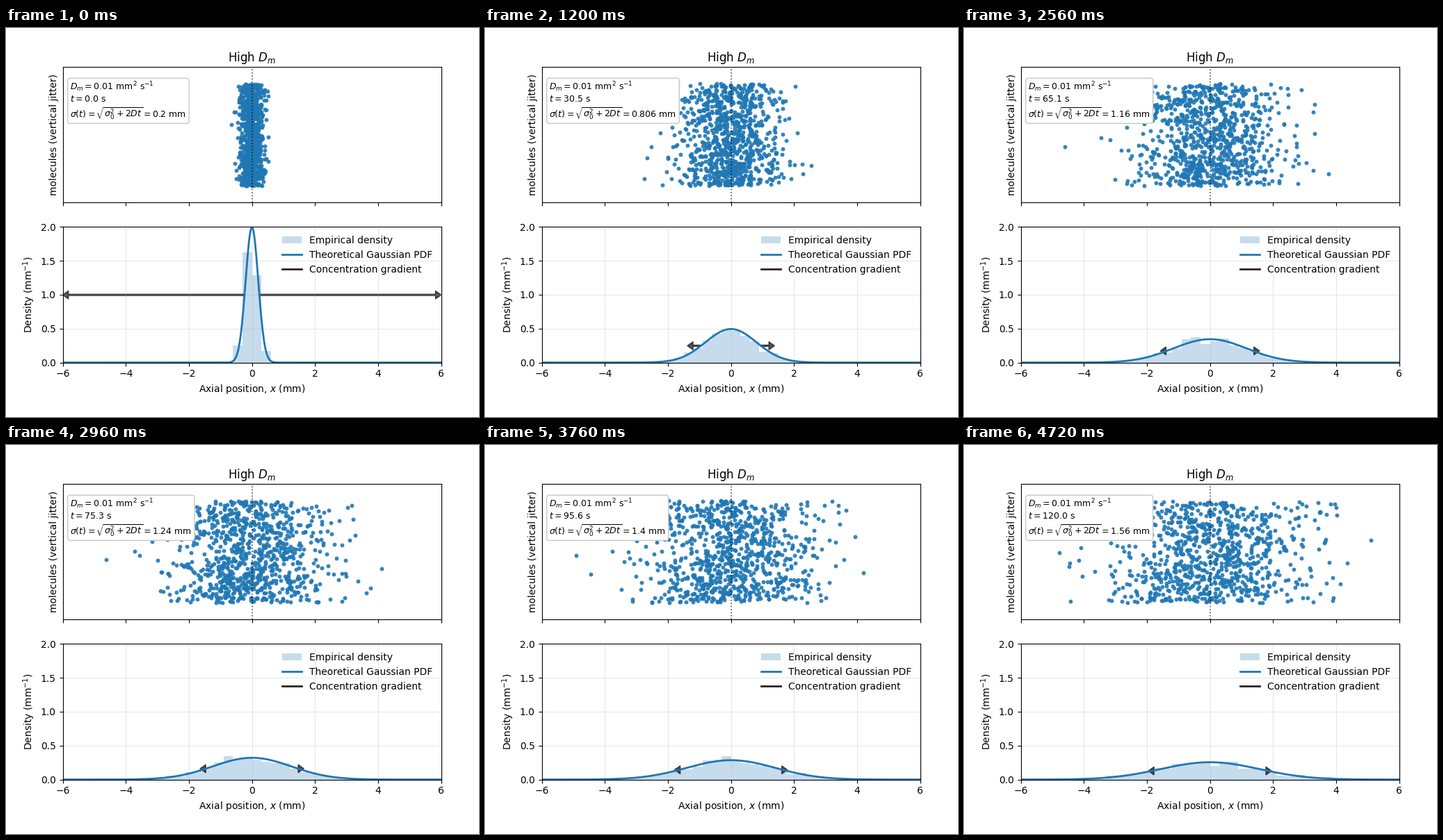
These frames come from a looping animation (680x560 px, 4800 ms). A matplotlib script:

```python
import numpy as np
import matplotlib.pyplot as plt
from matplotlib.animation import FuncAnimation
from matplotlib.lines import Line2D
from matplotlib.patches import FancyArrow

FRAMES, INTERVAL = 60, 80
DIFF, SIGMA0, T_END = 0.01, 0.2, 120.0
COUNT, HALF = 900, 6.0
JITTER, JITTER_STEP = 0.6, 0.02
BLUE, DARK = "tab:blue", "#222222"

rng = np.random.default_rng(7)
times = np.linspace(0, T_END, FRAMES)
sigmas = np.sqrt(SIGMA0**2 + 2 * DIFF * times)


def walk(start, step):
    """Random walks, one row per molecule and one column per time step."""
    moves = rng.normal(0, step, (COUNT, FRAMES - 1))
    return np.cumsum(np.column_stack([start, moves]), axis=1)


def reflect(y):
    """Fold values back into the jitter band."""
    return JITTER - np.abs((y + JITTER) % (4 * JITTER) - 2 * JITTER)


xs = walk(rng.normal(0, SIGMA0, COUNT), np.sqrt(2 * DIFF * times[1]))
ys = reflect(walk(rng.uniform(-JITTER, JITTER, COUNT), JITTER_STEP))

fig, (top, low) = plt.subplots(2, 1, sharex=True, figsize=(6.8, 5.6), dpi=100)
fig.subplots_adjust(left=0.12, right=0.92, bottom=0.14, top=0.9, hspace=0.18)

# Molecule cloud
dots = top.scatter(xs[:, 0], ys[:, 0], s=18, color=BLUE, alpha=0.9,
                   linewidths=0)
top.axvline(0, color="k", ls=":", lw=1.2, alpha=0.7)
top.set(xlim=(-HALF, HALF), ylim=(-0.8, 0.8), yticks=[],
        ylabel="molecules (vertical jitter)", title="High $D_m$")
info = top.text(0.02, 0.9, "", transform=top.transAxes, va="top", fontsize=9,
                bbox=dict(boxstyle="round", fc="white", ec="0.78"))

# Density plot
edges = np.linspace(-HALF, HALF, 41)
bars = low.bar(edges[:-1], np.zeros(40), width=np.diff(edges), align="edge",
               color=BLUE, alpha=0.25, linewidth=0, label="Empirical density")
grid_x = np.linspace(-HALF, HALF, 601)
curve, = low.plot([], [], color=BLUE, lw=2, label="Theoretical Gaussian PDF")
arrows = [
    low.add_patch(FancyArrow(0, 0, side, 0, width=0.02, head_width=0.12,
                             head_length=0.18, length_includes_head=True,
                             color=DARK, alpha=0.8, lw=1))
    for side in (-1, 1)
]
low.set(xlim=(-HALF, HALF), ylim=(0, 2), xlabel="Axial position, $x$ (mm)",
        ylabel="Density (mm$^{-1}$)")
low.grid(alpha=0.3)
gradient = Line2D([], [], color="k", alpha=0.85, lw=2,
                  label="Concentration gradient")
low.legend(handles=[bars, curve, gradient], loc="upper right", frameon=False)


def update(i):
    t, sigma = times[i], sigmas[i]
    dots.set_offsets(np.column_stack([xs[:, i], ys[:, i]]))
    info.set_text(
        "$D_m=0.01$ mm$^2$ s$^{-1}$\n"
        f"$t={float(f'{t:.3g}')}$ s\n"
        rf"$\sigma(t)=\sqrt{{\sigma_0^2+2Dt}}={sigma:.3g}$ mm")

    heights, _ = np.histogram(xs[:, i], bins=edges, density=True)
    for bar, height in zip(bars, heights):
        bar.set_height(height)

    peak = 1 / (sigma * np.sqrt(2 * np.pi))
    curve.set_data(grid_x, peak * np.exp(-0.5 * (grid_x / sigma) ** 2))

    # Arrows start at half maximum; their length follows the slope there.
    x_half = sigma * np.sqrt(2 * np.log(2))
    slope = x_half / sigma**2 * peak / 2
    length = min(1.2 * slope, HALF - x_half)
    for side, arrow in zip((-1, 1), arrows):
        arrow.set_data(x=side * x_half, y=peak / 2, dx=side * length, dy=0)
    return [dots, info, curve, *bars, *arrows]


anim = FuncAnimation(fig, update, frames=FRAMES, interval=INTERVAL,
                     init_func=lambda: update(0), repeat=True, repeat_delay=0)
plt.show()
```
